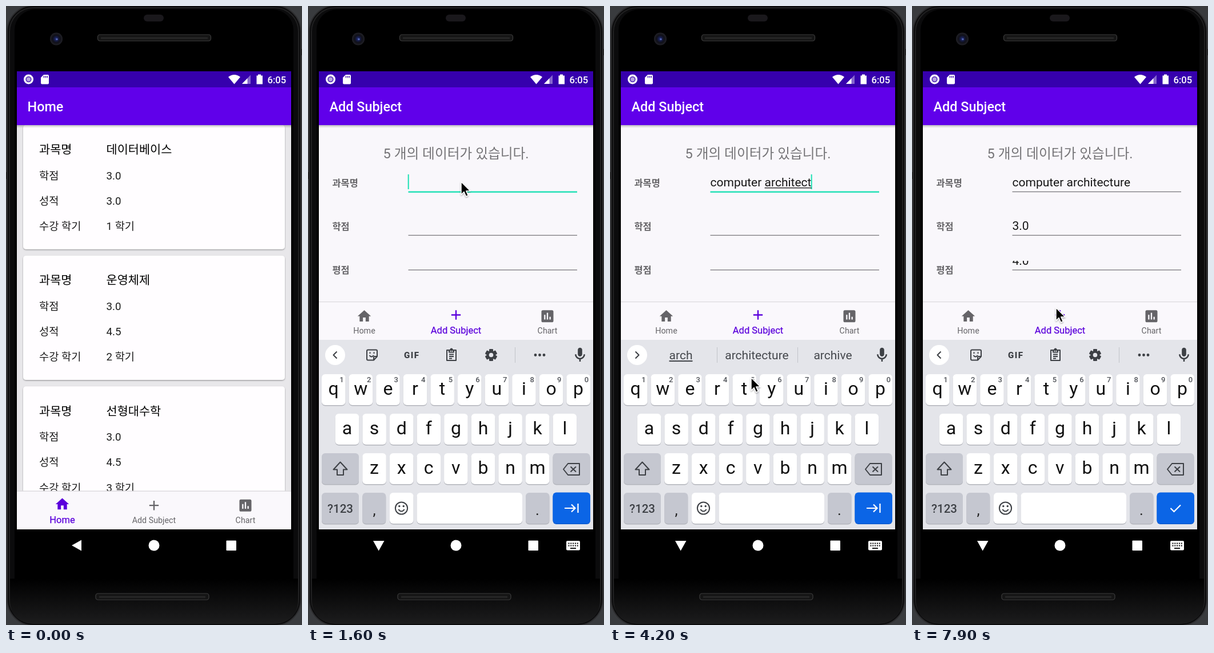
Write an HTML page that moves like this. It is 518 px wide and 1081 px high and loops after 8000 ms.

```html
<!DOCTYPE html>
<html lang="ko">
<head>
<meta charset="utf-8">
<title>Subject list</title>
<style>
html, body { margin: 0; width: 100%; height: 100%; overflow: hidden; background: #393b3e; }
svg { display: block; width: 518px; height: 1081px; }
text { font-family: Roboto, "Noto Sans CJK KR", "Noto Sans CJK JP", "Noto Sans CJK", sans-serif; white-space: pre; }
</style>
</head>
<body>
<svg id="stage" viewBox="0 0 518 1081" xmlns="http://www.w3.org/2000/svg">
  <defs>
    <linearGradient id="chin" x2="0" y2="1">
      <stop offset="0" stop-color="#000"/><stop offset="1" stop-color="#1c1c1d"/>
    </linearGradient>
    <linearGradient id="drop" x2="0" y2="1">
      <stop offset="0" stop-color="#000" stop-opacity=".24"/><stop offset="1" stop-color="#000" stop-opacity="0"/>
    </linearGradient>
    <radialGradient id="lens">
      <stop offset="0" stop-color="#2b3a86"/><stop offset=".3" stop-color="#161c46"/>
      <stop offset=".6" stop-color="#101018"/><stop offset="1" stop-color="#222228"/>
    </radialGradient>
    <filter id="soft" x="-5%" y="-5%" width="110%" height="115%">
      <feDropShadow dx="0" dy="1.2" stdDeviation="1.2" flood-color="#000" flood-opacity=".36"/>
    </filter>
    <filter id="arrow" x="-50%" y="-50%" width="200%" height="200%">
      <feDropShadow dx="0" dy="1.5" stdDeviation="1.2" flood-color="#000" flood-opacity=".35"/>
    </filter>
    <clipPath id="squeeze"><rect x="170" y="445" width="310" height="15"/></clipPath>
  </defs>

  <rect width="518" height="1081" fill="#393b3e"/>
  <rect y="290" width="5" height="12" fill="#1a1a1b"/>
  <rect x="513" y="75" width="5" height="11" fill="#1a1a1b"/>
  <rect x="2" y="-1" width="514" height="1083" rx="46" fill="#0b0b0c" stroke="#2d2d2f" stroke-width="2"/>
  <rect x="6" y="3" width="506" height="1075" rx="42" fill="none" stroke="#202021" stroke-width="2"/>
  <rect x="15" y="6" width="488" height="1060" rx="36"/>
  <path d="M7 1000H511V1036Q511 1078 468 1078H50Q7 1078 7 1036Z" fill="url(#chin)"/>
  <rect x="241" y="15" width="35" height="12" rx="6" fill="#1a181c"/>
  <circle cx="88" cy="57.5" r="11" fill="url(#lens)"/>
  <circle cx="89" cy="58" r="1.6" fill="#5b70bd"/>
  <g fill="#151515" stroke="#3d3d3d" stroke-width="1.2">
    <rect x="160.5" y="50" width="198" height="11" rx="4"/>
    <rect x="157" y="1026" width="198" height="11" rx="4"/>
    <path d="M166 56H353M163 1032H349" stroke="#272727" stroke-width="3"/>
  </g>

  <g id="home"></g>
  <g id="form"></g>
  <g id="nav"></g>

  <rect x="19" y="208" width="480" height="5" fill="url(#drop)"/>
  <rect x="19" y="114" width="480" height="29" fill="#3600ad"/>
  <rect x="19" y="142" width="480" height="66" fill="#6000ea"/>
  <text id="title" x="37.5" y="184" font-size="23.4" font-weight="500" fill="#fff"></text>
  <g fill="#fff">
    <circle cx="39.5" cy="128" r="8.5"/>
    <circle cx="39.5" cy="128" r="4.3" fill="#b9a6e2" stroke="#5b35b9" stroke-width="1.8"/>
    <path d="M66 120H73Q75 120 75 122V134.500Q75 136.500 73 136.500H63Q61 136.500 61 134.500V125Z"/>
    <path d="M66.5 122v3.500M69.5 122v3.500M72.3 122v3.500" stroke="#3600ad" stroke-width="1.3"/>
    <path d="M389 124Q399.5 116 410 124L399.5 136.500Z"/>
    <path d="M428 120.500V136H413Z" opacity=".4"/><path d="M422.5 126.200V136H413Z"/>
    <path d="M441 119.500h5v2h3V136.500H438.500V121.500h2.500Z"/>
    <text x="457.5" y="134.5" font-size="16.6" font-weight="500">6:05</text>
  </g>

  <g id="keys"></g>

  <g fill="#fff">
    <path id="back"/>
    <circle cx="259" cy="942" r="9.5"/>
    <rect x="385.5" y="933.5" width="17.5" height="17.5" rx="1"/>
    <g id="kbIcon">
      <rect x="452" y="934" width="24" height="16.5" rx="2"/>
      <path d="M455.5 938.500H473M455.5 942.500H473" stroke="#000" stroke-width="2" stroke-dasharray="2 1.800"/>
      <path d="M459 947H469" stroke="#000" stroke-width="1.8"/>
    </g>
  </g>
  <path id="mouse" d="M0 1V23.500L5 18.500L8.500 26.500L12.300 24.900L8.800 17H16Z" stroke="#fff" stroke-width="1.5" stroke-linejoin="round" filter="url(#arrow)"/>
</svg>

<script>
const $ = id => document.getElementById(id);
const show = (id, on) => $(id).setAttribute('display', on ? 'inline' : 'none');
const set = (id, attrs) => Object.entries(attrs).forEach(([k, v]) => $(id).setAttribute(k, v));
const rect = (x, y, w, h, fill, rx = 0) =>
  `<rect x="${x}" y="${y}" width="${w}" height="${h}" rx="${rx}" fill="${fill}"/>`;
const text = (x, y, size, fill, str, extra = '') =>
  `<text x="${x}" y="${y}" font-size="${size}" fill="${fill}" ${extra}>${str}</text>`;
const mid = 'text-anchor="middle"';
// Places a 24-unit icon around a centre point
const icon = (cx, cy, d, fill, s = 1.168) =>
  `<path transform="translate(${cx - 12 * s} ${cy - 12 * s}) scale(${s})" d="${d}" fill="${fill}" fill-rule="evenodd"/>`;

const ICONS = {
  home: 'M10 20v-6h4v6h5v-8h3L12 3 2 12h3v8z',
  add: 'M19 13h-6v6h-2v-6H5v-2h6V5h2v6h6v2z',
  chart: 'M19 3H5c-1.1 0-2 .9-2 2v14c0 1.1.9 2 2 2h14c1.1 0 2-.9 2-2V5c0-1.1-.9-2-2-2zM9 17H7v-7h2v7zm4 0h-2V7h2v10zm4 0h-2v-4h2v4z',
  mic: 'M12 14c1.66 0 3-1.34 3-3V5c0-1.66-1.34-3-3-3S9 3.34 9 5v6c0 1.66 1.34 3 3 3zM17 11c0 2.76-2.24 5-5 5s-5-2.24-5-5H5c0 3.53 2.61 6.43 6 6.92V21h2v-3.08c3.39-.49 6-3.39 6-6.92z'
};

function buildHome() {
  const cards = [['데이터베이스', '3.0'], ['운영체제', '4.5'], ['선형대수학', '4.5']];
  $('home').innerHTML = rect(19, 208, 480, 640, '#e8e7ea') + cards.map(([name, grade], i) => {
    const y = 207.7 + i * 228.3;
    const rows = [['학점', '3.0'], ['성적', grade], ['수강 학기', `${i + 1} 학기`]];
    return `<g filter="url(#soft)">${rect(30, y, 458, 217, '#fffdff', 5)}</g>` +
      text(58, y + 50.3, 20.8, '#000', '과목명') + text(175.5, y + 50.3, 20.8, '#000', name) +
      rows.map(([label, value], k) => {
        const by = y + 95 + k * 44.1;
        return text(58, by, 18.7, '#1c1c1c', label) + text(175.5, by, 18.7, '#1c1c1c', value);
      }).join('');
  }).join('');
}

function buildForm() {
  const rows = ['과목명', '학점', '평점', '수강 학기'];
  $('form').innerHTML = rect(19, 208, 480, 706, '#f9f7fb') +
    text(259, 265.5, 23.7, '#757477', '5 개의 데이터가 있습니다.', mid) +
    rows.map((label, i) => `<g id="row${i}">` +
      text(42.5, 314.5 + i * 76, 16.4, '#666568', label, 'font-weight="700"') +
      `<g id="slot${i}"><text id="in${i}" x="175.5" font-size="21" fill="#161616"></text>` +
      `<rect id="caret${i}" width="2" fill="#1de0b4"/></g>` +
      `<rect id="mark${i}" height="1.3" fill="#161616"/>` +
      `<rect id="line${i}" x="175.5" width="295.5"/></g>`).join('');
}

function buildNav() {
  const tabs = [['home', 'Home', 98.5], ['add', 'Add Subject', 259], ['chart', 'Chart', 419]];
  const draw = active => tabs.map(([key, label, x], i) => {
    const on = i === active, fill = on ? '#5b00dc' : '#656468';
    return icon(x, on ? 22 : 24.2, ICONS[key], fill) +
      text(x, 54.5, on ? 16.5 : 14.3, fill, label, mid + (on ? ' stroke="#5b00dc" stroke-width=".25"' : ''));
  }).join('');
  $('nav').innerHTML = rect(19, -1.5, 480, 1.5, '#dddbdf') + rect(19, 0, 480, 66, '#faf8fc') +
    `<g id="tab0">${draw(0)}</g><g id="tab1">${draw(1)}</g>`;
}

function buildKeys() {
  const pitch = 47.6, dark = '#c5c7d0', ink = '#3d4045';
  const key = (x, y, w, fill = '#fff', edge = '#b3b5bc') =>
    rect(x, y + 1.5, w, 54, edge, 6) + rect(x, y, w, 54, fill, 6);
  const letters = (str, x0, y) => [...str].map((c, i) => {
    const x = x0 + i * pitch;
    return key(x, y, 41.5) + text(x + 20.7, y + 36, 32, '#111', c, mid);
  }).join('');
  const digits = [...'1234567890'].map((d, i) =>
    text(59 + i * pitch, 656.5, 13, '#505359', d, mid + ' font-weight="500"')).join('');
  const teeth = Array.from({ length: 6 }, (_, i) =>
    `<rect x="317" y="599" width="7" height="6" rx="1.2" transform="rotate(${i * 60} 320.5 609.5)"/>`).join('');
  const sep = x => `<path d="M${x} 596V623" stroke="#c1c3c9"/>`;
  const stroke = `fill="none" stroke="${ink}" stroke-width="2" stroke-linejoin="round"`;
  const dots = (xs, y, r) => xs.map(x => `<circle cx="${x}" cy="${y}" r="${r}" fill="${ink}"/>`).join('');

  $('keys').innerHTML = rect(19, 583, 480, 330.5, '#e4e5ea') +
    `<circle cx="47.5" cy="609.5" r="17.5" fill="#fff"/>
    <path id="chevron" ${stroke}/>` + icon(476, 609.5, ICONS.mic, ink, 1.27) +
    `<g id="words">${sep(187.5)}${sep(328.5)}` +
    [124, 257, 390].map((x, i) => `<text id="word${i}" x="${x}" y="617" font-size="21" fill="#45484d" ${mid}></text>`).join('') +
    `</g><g id="tools">${sep(362.5)}
      <g ${stroke}><path d="M105 600.500H119Q121 600.500 121 602.500V612L115 618.500H105Q103 618.500 103 616.500V602.500Q103 600.500 105 600.500ZM121 612H117Q115 612 115 614V618.500M107.5 610Q111 615 115 610"/>
      <path d="M108.5 604.500v2.500M115.5 604.500v2.500"/>
      <path d="M243 601H259V619H243ZM247 601V604.500H255V601M247 608.500H255M247 612H255M247 615.500H252"/></g>
      ${dots([251], 600, 2.5)}
      ${text(181.8, 615, 15, ink, 'GIF', mid + ' font-weight="900" letter-spacing="1.6"')}
      <g fill="${ink}">${teeth}</g>
      <circle cx="320.5" cy="609.5" r="5.8" fill="#e4e5ea" stroke="${ink}" stroke-width="4"/>
      ${dots([398, 405.5, 413], 609.5, 2.4)}
    </g>` +
    letters('qwertyuiop', 24, 643) + digits + letters('asdfghjkl', 47.8, 712) +
    letters('zxcvbnm', 95.3, 781) +
    key(24, 781, 65, dark) + key(428.5, 781, 65, dark) +
    key(24, 850, 65, dark) + key(95.3, 850, 41, dark) + key(143, 850, 41.5) +
    key(190.5, 850, 184.5) + key(381, 850, 41.5, dark) + key(428.5, 849.5, 65.5, '#0b65e6', '#0a5bd0') +
    text(56.5, 884.5, 20.5, ink, '?123', mid + ' font-weight="500"') +
    text(116, 889, 26, '#222', ',', mid) + text(401.5, 889, 26, '#222', '.', mid) +
    `<g ${stroke}>
      <path d="M56.5 796.500L68.5 809.500H62V819H51V809.500H44.500Z"/>
      <path d="M455 799H475V819H455L447 809ZM459.5 804.500L469 813.500M469 804.500L459.5 813.500"/>
      <circle cx="163.5" cy="877" r="10.6"/><path d="M158.3 879Q163.5 886 168.7 879"/>
    </g>` + dots([159.8, 167.2], 873.5, 1.7) +
    '<path id="enter" fill="none" stroke="#fff" stroke-width="2.2"/>';
}

// Typed values: [time, text]
const full = 'computer architecture';
const typed = [
  [[0, ''], [1700, 'c'], [2300, 'co'], [2400, 'com'], [2500, 'comp'], [2800, 'computer'], [3000, 'computer and'],
   [3400, 'computer an'], [3500, 'computer a'],
   ...Array.from({ length: 11 }, (_, i) => [3700 + i * 70, full.slice(0, 11 + i)])],
  [[0, ''], [4900, '3'], [5000, '3.'], [5500, '3.0']],
  [[0, ''], [6400, '4'], [6600, '4.'], [6800, '4.0']],
  [[0, '']]
];
const hints = [
  [0, 'c', 'can', 'cool'], [2300, 'co', 'come', 'could'], [2400, 'com', 'come', 'coming'],
  [2500, 'comp', 'computer', 'company'], [2800, 'is', 'and', 'science'], [3000, 'the', 'phone', 'a'],
  [3400, 'an', 'and', 'any'], [3500, 'a', 'and', 'the'], [3700, 'ar', 'are', 'around'],
  [3900, 'arch', 'architecture', 'archive']
];
const path = [
  [800, 261, 1025], [900, 261, 1025], [1100, 259, 882], [1200, 259, 882], [1500, 268, 306], [1700, 268, 306],
  [2100, 264, 631], [2600, 264, 631], [2800, 252, 606], [3000, 247, 614], [3600, 247, 614], [3900, 247, 648],
  [4500, 247, 648], [4750, 244, 372], [5500, 244, 372], [5800, 250, 448], [6700, 250, 448],
  [7100, 123, 948], [7300, 123, 948], [7700, 252, 526], [8000, 252, 526]
];
const focusTimes = [[0, -1], [1600, 0], [4800, 1], [5900, 2], [7800, 3]];

const latest = (list, t) => list.filter(s => s[0] <= t).pop();

function pointer(t) {
  const i = Math.max(1, path.findIndex(p => p[0] > t));
  const [a, b] = [path[i - 1], path[i]];
  const u = Math.min(1, Math.max(0, (t - a[0]) / (b[0] - a[0])));
  const e = u * u * (3 - 2 * u);
  return [1, 2].map(k => a[k] + (b[k] - a[k]) * e);
}

function drawField(i, t, focus, keyboard) {
  const [since, value] = latest(typed[i], t);
  const tight = i === 2 && keyboard, on = focus === i;
  const base = tight ? 452 : 315 + i * 76;
  const input = $('in' + i);
  input.textContent = value;
  input.setAttribute('y', base);
  const end = 175.5 + (value ? input.getComputedTextLength() : 0);
  const start = Math.max(since, latest(focusTimes, t)[0]);
  set('caret' + i, { x: end - 0.8, y: base - 21, height: 26 });
  show('caret' + i, on && (t - start) % 1000 < 500);
  set('slot' + i, { 'clip-path': tight ? 'url(#squeeze)' : 'none' });
  const lineY = tight ? 460 : 323.5 + i * 76;
  set('line' + i, { y: on ? lineY : lineY + 0.3, height: on ? 2.4 : 1.3, fill: on ? '#1de0b4' : '#7b7a7d' });
  const composing = i === 0 && (t >= 1700 && t < 2800 || t >= 3400 && t < 4600);
  const from = value.lastIndexOf(' ') + 1;
  const x = 175.5 + (from ? input.getSubStringLength(0, from) : 0);
  set('mark' + i, { x, y: base + 2, width: Math.max(0, end - x) });
  show('mark' + i, composing);
}

function render(t) {
  const adding = t >= 1300;
  const keyboard = t >= 1600 && t < 7400 || t >= 7800;
  const focus = latest(focusTimes, t)[1];
  const words = t >= 1700 && t < 4800;

  show('home', !adding);
  show('form', adding);
  $('title').textContent = adding ? 'Add Subject' : 'Home';
  set('nav', { transform: `translate(0 ${keyboard ? 517.5 : 848})` });
  show('tab0', !adding);
  show('tab1', adding);
  show('keys', keyboard);
  show('kbIcon', keyboard);
  set('back', { d: keyboard ? 'M114 934H133.500L123.700 951.500Z' : 'M132 932.500V951.500L115 942Z' });

  show('words', words);
  show('tools', !words);
  set('chevron', { d: words ? 'M44.5 603.500L50.5 609.500L44.5 615.500' : 'M50.5 603.500L44.5 609.500L50.5 615.500' });
  latest(hints, t).slice(1).forEach((w, i) => $('word' + i).textContent = w);
  const literal = t < 2800 || t >= 3400;
  set('word0', { 'text-decoration': literal ? 'underline' : 'none' });
  set('enter', { d: focus === 3 ? 'M452.5 877L458.5 883L470 871.500' : 'M449 877H467M461 870.500L467.5 877L461 883.500M472.5 869V885' });

  if (adding) for (let i = 0; i < 4; i++) drawField(i, t, focus, keyboard);
  show('row3', !keyboard);

  const [x, y] = pointer(t);
  set('mouse', { transform: `translate(${x} ${y})` });
  show('mouse', t >= 800);
}

buildHome();
buildForm();
buildNav();
buildKeys();

const begin = performance.now();
function tick() {
  const t = (performance.now() - begin) % 8000;
  render(Math.floor(t / 100) * 100);
  requestAnimationFrame(tick);
}
tick();
</script>
</body>
</html>
```
